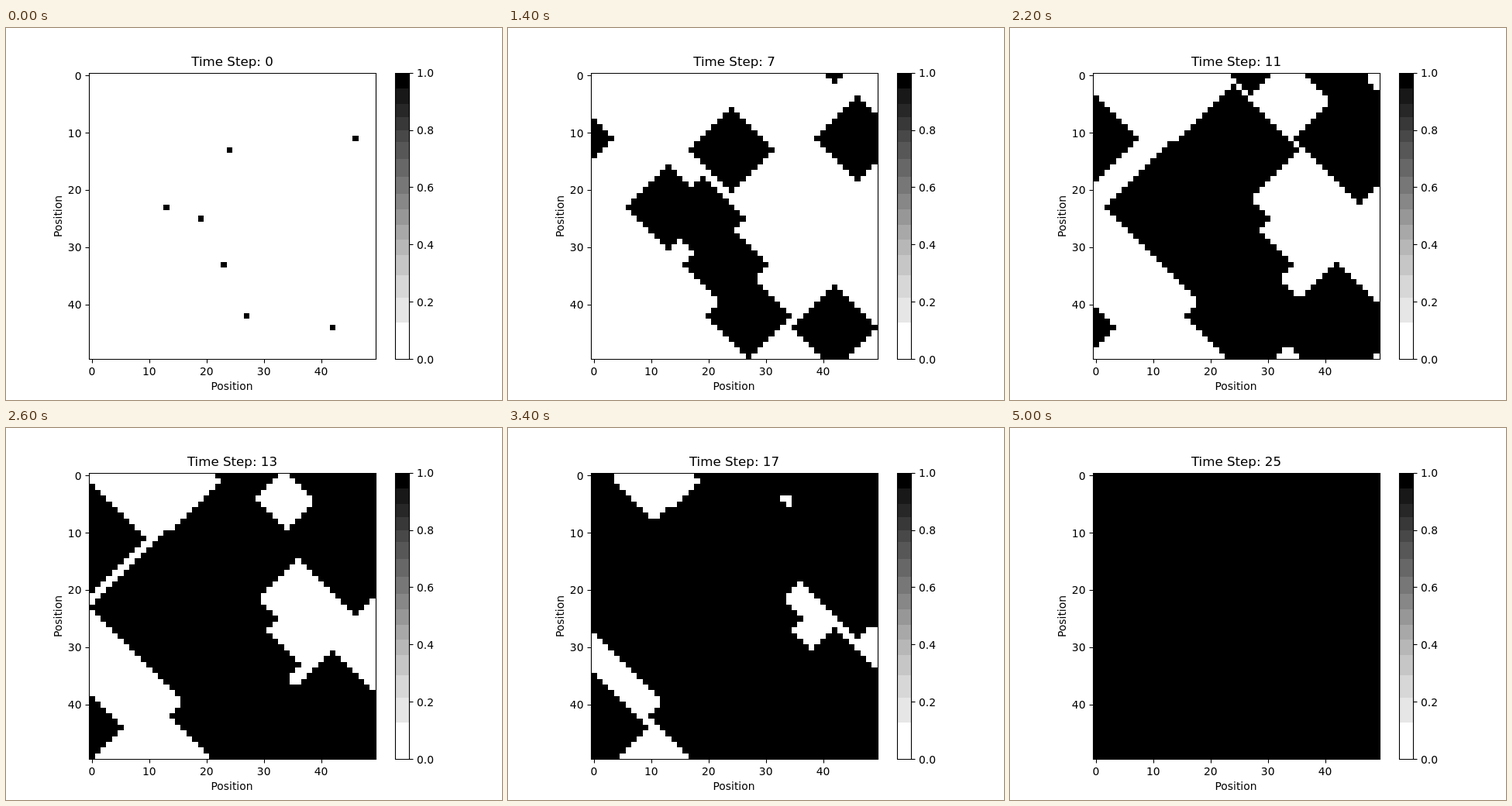
Animation of 640 by 480 pixels, one loop 5.2 s. Source, as an HTML page:

```html
<!DOCTYPE html>
<html lang="en">
<head>
<meta charset="utf-8">
<title>Spreading cells</title>
<style>
  html, body { margin: 0; width: 100%; height: 100%; overflow: hidden; background: #fff; }
  svg { display: block; width: 640px; height: 480px; }
  text { font: 13.889px "DejaVu Sans", sans-serif; fill: #000; }
  #title { font-size: 16.667px; }
  .mid { text-anchor: middle; }
  .end { text-anchor: end; }
  .line { fill: none; stroke: #000; stroke-width: 1.11; }
  .crisp { shape-rendering: crispEdges; }
</style>
</head>
<body>
<svg viewBox="0 0 640 480">
  <path id="cells" class="crisp"/>
  <g id="bar" class="crisp"></g>
  <g id="axes"></g>
  <text id="title" class="mid" x="292" y="49"></text>
</svg>
<script>
const N = 50, STEPS = 26, STEP_MS = 200;
const LEFT = 107.2, TOP = 57.6, SIZE = 369.6, CELL = SIZE / N;
const BOTTOM = TOP + SIZE;
const seeds = [[46, 11], [24, 13], [13, 23], [19, 25], [23, 33], [27, 42], [42, 44]];
const $ = id => document.getElementById(id);

function add(parent, tag, attrs, text = '') {
  const el = document.createElementNS('http://www.w3.org/2000/svg', tag);
  for (const k in attrs) el.setAttribute(k, attrs[k]);
  el.textContent = text;
  return parent.appendChild(el);
}
const snap = v => Math.round(v) + 0.5;
const line = d => add($('axes'), 'path', { class: 'line', d });
const label = (x, y, text, cls = '') => add($('axes'), 'text', { x, y, class: cls }, text);

function drawAxes() {
  for (let v = 0; v < N; v += 10) {
    const x = LEFT + (v + 0.5) * CELL, y = TOP + (v + 0.5) * CELL;
    line(`M${snap(x)} 427.5V432.5`);
    line(`M107.5 ${snap(y)}H102.5`);
    label(x, 448, v, 'mid');
    label(97.5, Math.round(y + 5.3), v, 'end');
  }
  for (let i = 0; i <= 5; i++) {
    const y = BOTTOM - SIZE * i / 5;
    line(`M520.5 ${snap(y)}H525.5`);
    label(530, Math.round(y + 5.3), (i / 5).toFixed(1));
  }
  label(291.5, 467, 'Position', 'mid');
  add($('axes'), 'text', { class: 'mid', transform: 'translate(72 243) rotate(-90)' }, 'Position');
  line('M107.5 58.5H477.5V427.5H107.5Z');
  line('M502.5 58.5H520.5V427.5H502.5Z');
}

function drawBar() {
  const edges = [58, 78, 98, 115, 132, 147, 169, 192, 214, 234, 254, 273, 293, 319, 348, 380, 428];
  const grays = [0, 24, 39, 56, 72, 87, 103, 119, 135, 151, 168, 183, 198, 215, 230, 255];
  grays.forEach((g, i) => add($('bar'), 'rect', {
    x: 502, y: edges[i], width: 19, height: edges[i + 1] - edges[i], fill: `rgb(${g},${g},${g})`
  }));
}

// The grid wraps round at its edges.
function gap(a, b) {
  const d = Math.abs(a - b);
  return Math.min(d, N - d);
}
const filled = (x, y, r) => seeds.some(([sx, sy]) => gap(x, sx) + gap(y, sy) <= r);

function cellPath(r) {
  const px = i => Math.round(LEFT + i * CELL), py = i => Math.round(TOP + i * CELL);
  let d = '';
  for (let y = 0; y < N; y++) {
    for (let x = 0; x < N; x++) {
      if (!filled(x, y, r)) continue;
      const start = x;
      while (x < N && filled(x, y, r)) x++;
      d += `M${px(start)} ${py(y)}H${px(x)}V${py(y + 1)}H${px(start)}Z`;
    }
  }
  return d;
}

let shown = -1;
function render(ms) {
  const step = Math.floor(ms / STEP_MS) % STEPS;
  if (step === shown) return;
  shown = step;
  $('cells').setAttribute('d', cellPath(step));
  $('title').textContent = `Time Step: ${step}`;
}

drawBar();
drawAxes();
render(0);
const t0 = performance.now();
function tick() {
  render(performance.now() - t0);
  requestAnimationFrame(tick);
}
requestAnimationFrame(tick);
</script>
</body>
</html>
```
